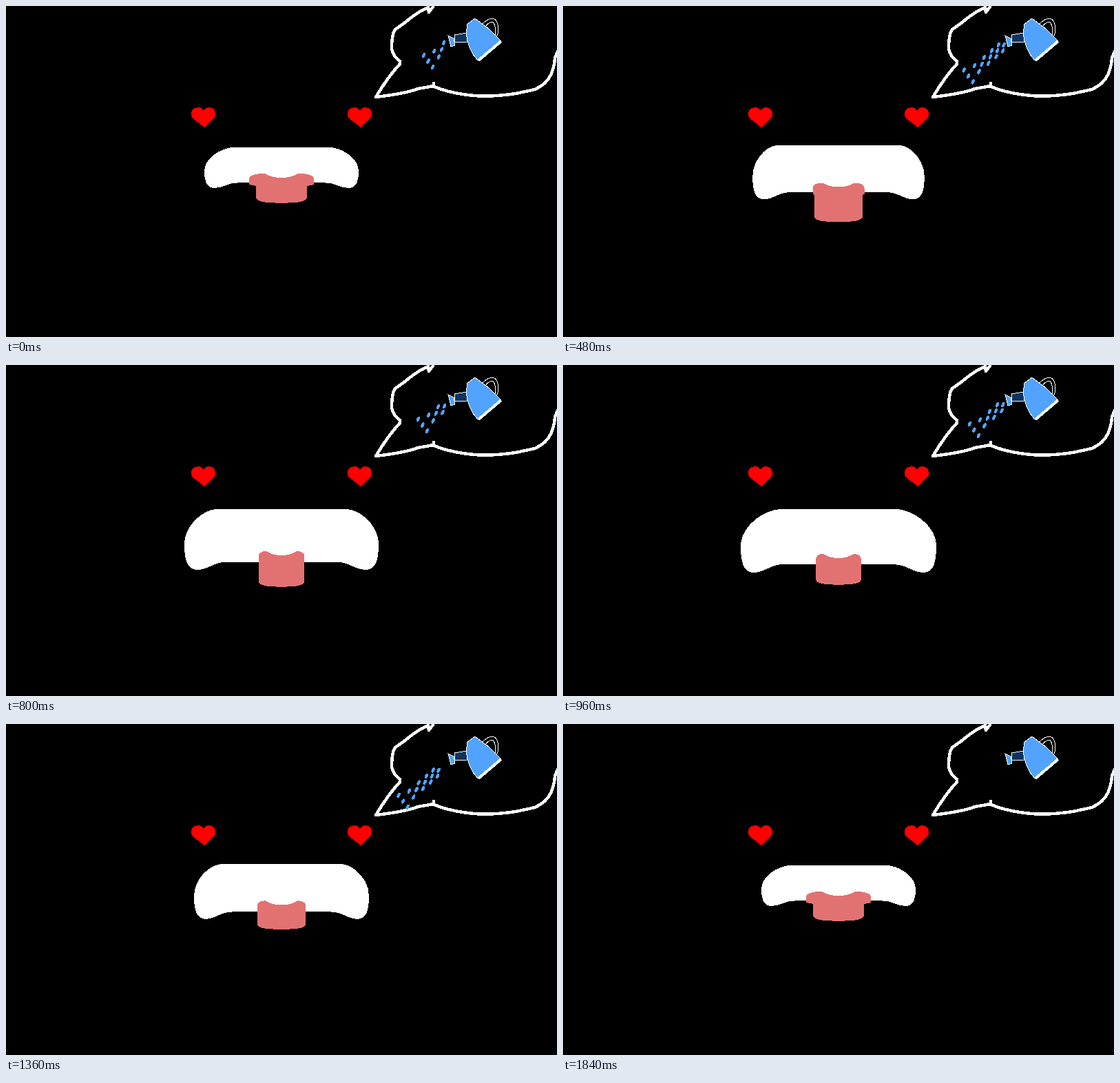
These frames come from a looping animation (800x480 px, 1920 ms). An HTML page:

```html
<!DOCTYPE html>
<html>
<head>
<meta charset="utf-8">
<style>
html, body { margin: 0; width: 100%; height: 100%; overflow: hidden; background: #000; }
svg { display: block; }
</style>
</head>
<body>
<svg width="800" height="480" viewBox="0 0 800 480" shape-rendering="crispEdges">
  <g fill="none" stroke="#fff" stroke-width="4.5" stroke-linejoin="round" stroke-linecap="round">
    <path d="M620 1L614 9L613 2Q598 8 578 25L565 34Q560 41 560 62Q562 73 572 80"/>
    <path d="M572 84Q555 102 537 132Q580 127 598 120L621 116V112M622 117Q640 125 670 129Q700 133 740 127L768 121Q785 113 791 100Q797 85 797 75L801 66"/>
  </g>
  <g stroke="#fff">
    <path d="M692 26Q699 18 708 18Q715 22 715 36L712 47M696 30Q701 23 707 23Q712 29 710 43" fill="none"/>
    <path d="M651 42L669 39V52L652 53Z" fill="#0f3460"/>
    <path d="M642 43L650 47L652 57L646 59Z" fill="#52a3ff"/>
    <path d="M681 18L670 26L668 40Q671 64 685 79L718 50L701 33Z" fill="#52a3ff"/>
    <path d="M686 79L719 51" stroke-width="4"/>
  </g>
  <g fill="#f00">
    <path id="heart" d="M288 176L270 162Q267 153 273 148L280 147Q284 147 287 152Q290 147 294 147L300 148Q306 154 303 162Z"/>
    <use href="#heart" x="227"/>
  </g>
  <g id="face">
    <path id="mouth" fill="#fff"/>
    <path id="tongue" fill="#e27272"/>
  </g>
  <use href="#face" transform="matrix(-1 0 0 1 800 0)"/>
  <g id="spray" fill="#52a3ff"></g>
</svg>
<script>
const STEP = 80, STEPS = 24, MID = 400;
const $ = id => document.getElementById(id);

// Mouth: half width, half of the flat top, top, lowest point.
// Tongue: half width, ear, notch, tip.
const poses = [
  { at: 0, mouth: [112, 72, 205, 264], tongue: [37, 10, 249, 286] },
  { at: 3, mouth: [115, 76, 200, 269], tongue: [38, 7, 249, 294] },
  { at: 7, mouth: [128, 96, 203, 284], tongue: [34, 1, 267, 320] },
  { at: 8, mouth: [140, 106, 209, 293], tongue: [33.5, 0, 272, 325] },
  { at: 12, mouth: [142, 85, 209, 301], tongue: [33, 0, 280, 319] },
  { at: 14, mouth: [139, 82, 209, 293], tongue: [33, 0, 272, 306] },
  { at: 19, mouth: [119, 92, 199, 276], tongue: [37, 0, 256, 293] }
];
poses.push({ ...poses[0], at: STEPS - 1 });

function pose(part, step) {
  const i = Math.max(1, poses.findIndex(p => p.at >= step));
  const a = poses[i - 1], b = poses[i];
  const u = (step - a.at) / (b.at - a.at);
  return a[part].map((v, k) => v + (b[part][k] - v) * u);
}

// Both shapes are left halves; the page mirrors them
function mouthPath([w, flat, top, low]) {
  const x = k => MID - k * w, h = low - top;
  const under = low - 0.13 * h, side = top + 0.58 * h, edge = MID - flat;
  return `M${MID} ${top}V${under}H${x(0.56)}
    C${x(0.7)} ${under} ${x(0.75)} ${low} ${x(0.87)} ${low}
    C${x(0.98)} ${low} ${x(1)} ${low - 0.2 * h} ${x(1)} ${side}
    C${x(1)} ${top + 0.28 * h} ${edge - 0.45 * (w - flat)} ${top + 2} ${edge} ${top}Z`;
}

function tonguePath([w, ear, notch, tip]) {
  const x = k => MID - k * w, out = x(1) - ear;
  return `M${MID} ${tip}V${notch}
    C${x(0.3)} ${notch} ${x(0.45)} ${notch - 2} ${x(0.65)} ${notch - 6}
    Q${out} ${notch - 6} ${out} ${notch + 2}V${notch + 10}
    L${x(1)} ${notch + 12}V${tip - 9}
    Q${x(1)} ${tip - 2} ${x(0.5)} ${tip - 1}Z`;
}

// Rows of drops along the jet: three in front, then two and one in turn
const drops = [];
for (let row = 0; row < 9; row++) {
  const s = 12 * row ** 0.7, count = row ? 1 + row % 2 : 3;
  for (let i = 0; i < count; i++) {
    const side = i - (count - 1) / 2;
    drops.push([613 + s + 6.5 * side, 80 - 0.87 * s + 8.5 * side]);
  }
}

function spray(step) {
  if (step === STEPS - 1) return "";
  const age = step - (step < 9 ? 0 : step < 18 ? 8 : 18);
  return drops
    .map(([x, y]) => [x - 4.05 * age, y + 3.55 * age])
    .filter(([x, y]) => x < 642 && y > 51)
    .map(([x, y]) => `<ellipse rx="2.2" ry="4" transform="translate(${x} ${y}) rotate(25)"/>`)
    .join("");
}

let shown = -1;
function draw() {
  const step = Math.floor(performance.now() / STEP) % STEPS;
  if (step !== shown) {
    shown = step;
    $("mouth").setAttribute("d", mouthPath(pose("mouth", step)));
    $("tongue").setAttribute("d", tonguePath(pose("tongue", step)));
    $("spray").innerHTML = spray(step);
  }
  requestAnimationFrame(draw);
}
draw();
</script>
</body>
</html>
```
